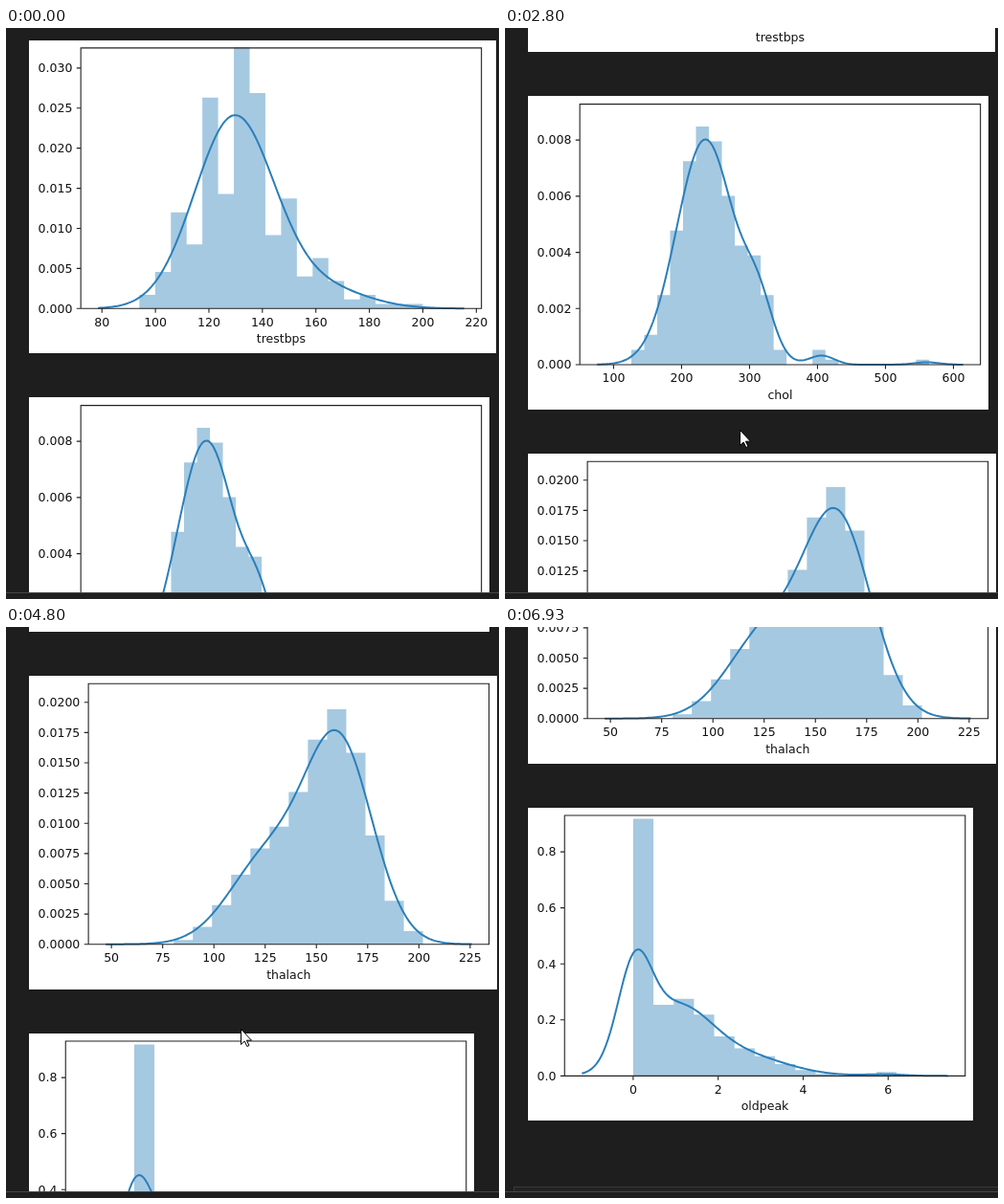
Write an HTML page that moves like this. It is 515 px wide and 597 px high and loops after 8140 ms.

```html
<!DOCTYPE html>
<html lang="en">
<head>
<meta charset="utf-8">
<title>Distribution plots</title>
<style>
  html, body { margin: 0; width: 100%; height: 100%; overflow: hidden; background: #1e1e1e; }
  svg { display: block; }
  text { font: 12.5px "DejaVu Sans", sans-serif; fill: #111; text-anchor: middle; }
  .y { text-anchor: end; }
  .bars { fill: #a5c9e1; }
  .axis { fill: none; stroke: #222; stroke-width: 1.1; }
  .curve { fill: none; stroke: #2b7fb9; stroke-width: 2; stroke-linejoin: round; stroke-linecap: square; }
</style>
</head>
<body>
<svg width="515" height="597" viewBox="0 0 515 597">
  <clipPath id="view"><rect width="515" height="590"/></clipPath>
  <g clip-path="url(#view)"><g id="page"></g></g>
  <path d="M0 590.5H515" stroke="#474747"/>
  <path id="cursor" d="M.5.5v16l3.7-3.5 2.6 5.5 2.2-1-2.6-5.3h5.1z" fill="#fff" stroke="#000"/>
</svg>
<script>
const LOOP = 8140, TICK = 200 / 3, SAMPLES = 297, W = 418.5, H = 272.4;

// mix: groups of the sampled people as share, mean, spread
// heap: share of values rounded to the nearest ten; bw: smoothing of the curve
const charts = [
  { name: 'trestbps', lo: 94, hi: 200, bins: 18, bw: 5.03, heap: .43,
    mix: [[.89, 129.5, 14], [.095, 163, 15]],
    x: [80, 220, 20], y: [0, .03, .005], yMax: .0325, digits: 3 },
  { name: 'chol', lo: 126, hi: 564, bins: 23, bw: 16.3, heap: 0,
    mix: [[.85, 235, 39], [.1, 313, 15], [.015, 406, 9], [.004, 560, 9]],
    x: [100, 600, 100], y: [0, .008, .002], yMax: .00928, digits: 3 },
  { name: 'thalach', lo: 71, hi: 202, bins: 14, bw: 7.78, heap: 0,
    mix: [[.675, 161, 14.5], [.325, 126, 17]],
    x: [50, 225, 25], y: [0, .02, .0025], yMax: .02154, digits: 4 },
  { name: 'oldpeak', lo: 0, hi: 6.2, bins: 13, bw: .395, heap: 0,
    mix: [[.323, .03, .02], [.478, 1, .72], [.175, 2.6, .95], [.007, 5.9, .3]],
    x: [0, 6, 2], y: [0, .8, .2], yMax: .93, digits: 1 }
];

const ticks = ([from, to, step]) =>
  Array.from({ length: Math.round((to - from) / step) + 1 }, (_, i) => from + i * step);
const bell = (z, sd) => Math.exp(-z * z / 2) / (sd * Math.sqrt(2 * Math.PI));
const normalCdf = z => 1 / (1 + Math.exp(-1.5976 * z - .07056 * z ** 3));

function drawChart(c, index) {
  const top = 12.7 + 373.7 * index, base = top + 280.6;
  const left = 54.3 + 7.95 * c.digits;
  const bin = (c.hi - c.lo) / c.bins;
  const start = c.lo - 3 * c.bw, span = c.hi - c.lo + 6 * c.bw;
  const px = v => left + (v - start + span * .05) / (span * 1.1) * W;
  const py = d => base - d / c.yMax * H;

  const density = v => c.mix.reduce((sum, [share, mean, sd]) => {
    const wide = Math.hypot(sd, c.bw);
    return sum + share * bell((v - mean) / wide, wide);
  }, 0);
  const cdf = v => c.mix.reduce((sum, [share, mean, sd]) => sum + share * normalCdf((v - mean) / sd), 0);
  const heaped = v => (1 - c.heap) * cdf(v) + c.heap * cdf(Math.floor(v / 10) * 10 + 5);
  // the outer bins also take the tails
  const below = k => k === 0 ? 0 : k === c.bins ? cdf(Infinity) : heaped(c.lo + bin * k);

  let bars = `M${px(c.lo)} ${base}`;
  for (let k = 0; k < c.bins; k++) {
    const count = Math.round(SAMPLES * (below(k + 1) - below(k)));
    bars += `V${py(count / SAMPLES / bin)}H${px(c.lo + bin * (k + 1))}`;
  }
  const curve = Array.from({ length: 160 }, (_, i) => {
    const v = start + span * i / 159;
    return px(v).toFixed(2) + ',' + py(density(v)).toFixed(2);
  }).join(' ');

  let axis = `M${left} ${base}v${-H}h${W}v${H}z`, labels = '';
  for (const v of ticks(c.x)) {
    axis += `M${px(v)} ${base}v4.4`;
    labels += `<text x="${px(v)}" y="${base + 18.4}">${v}</text>`;
  }
  for (const d of ticks(c.y)) {
    axis += `M${left} ${py(d)}h-4.4`;
    labels += `<text class="y" x="${left - 8.8}" y="${py(d) + 4.3}">${d.toFixed(c.digits)}</text>`;
  }
  labels += `<text x="${left + W / 2}" y="${base + 36}">${c.name}</text>`;

  const right = Math.round(Math.max(left + W + 8, px(c.x[1]) + 20.6));
  const y = Math.round(top), height = Math.round(top + 327.5) - y;
  return `<rect x="24" y="${y}" width="${right - 24}" height="${height}" fill="#fff"/>
    <path class="bars" d="${bars}V${base}z"/>
    <polyline class="curve" points="${curve}"/>
    <path class="axis" d="${axis}"/>${labels}`;
}

const page = document.getElementById('page');
const cursor = document.getElementById('cursor');
page.innerHTML = charts.map(drawChart).join('') +
  '<rect x="9.5" y="1530.5" width="520" height="60" fill="#222" stroke="#3a3a3a"/>';

// time and number of wheel notches turned by then
const wheel = [[1400, 1], [2795, 4], [5200, 10], [5270, 11], [5730, 12]];

function notches(t) {
  if (t < wheel[0][0]) return 0;
  const i = wheel.findIndex(([time]) => time > t);
  if (i < 0) return wheel.at(-1)[1];
  const [[t0, n0], [t1, n1]] = [wheel[i - 1], wheel[i]];
  return n0 + Math.floor((t - t0) / (t1 - t0) * (n1 - n0));
}

// the pointer crosses the bottom edge, comes back to rest, then leaves
function pointer(step) {
  if (step >= 1 && step < 3) return [520 - 40 * step, 574 + 7 * step];
  if (step < 14 || step >= 104) return null;
  const arrive = 1 - (1 - Math.min(1, (step - 14) / 3)) ** 1.6;
  const leave = Math.max(0, (step - 97) / 6);
  return [171 + 74 * arrive - 189 * leave, 517 - 97 * arrive + 168 * leave];
}

function draw(t) {
  const scroll = Math.round(Math.max(0, 78.75 * notches(t) - .1));
  page.setAttribute('transform', `translate(0 ${-scroll})`);
  const at = pointer(Math.floor((t + 5) / TICK));
  cursor.setAttribute('visibility', at ? 'visible' : 'hidden');
  if (at) cursor.setAttribute('transform', `translate(${at.map(Math.round)})`);
}

const begin = performance.now();
function tick() {
  draw((performance.now() - begin) % LOOP);
  requestAnimationFrame(tick);
}
tick();
</script>
</body>
</html>
```
